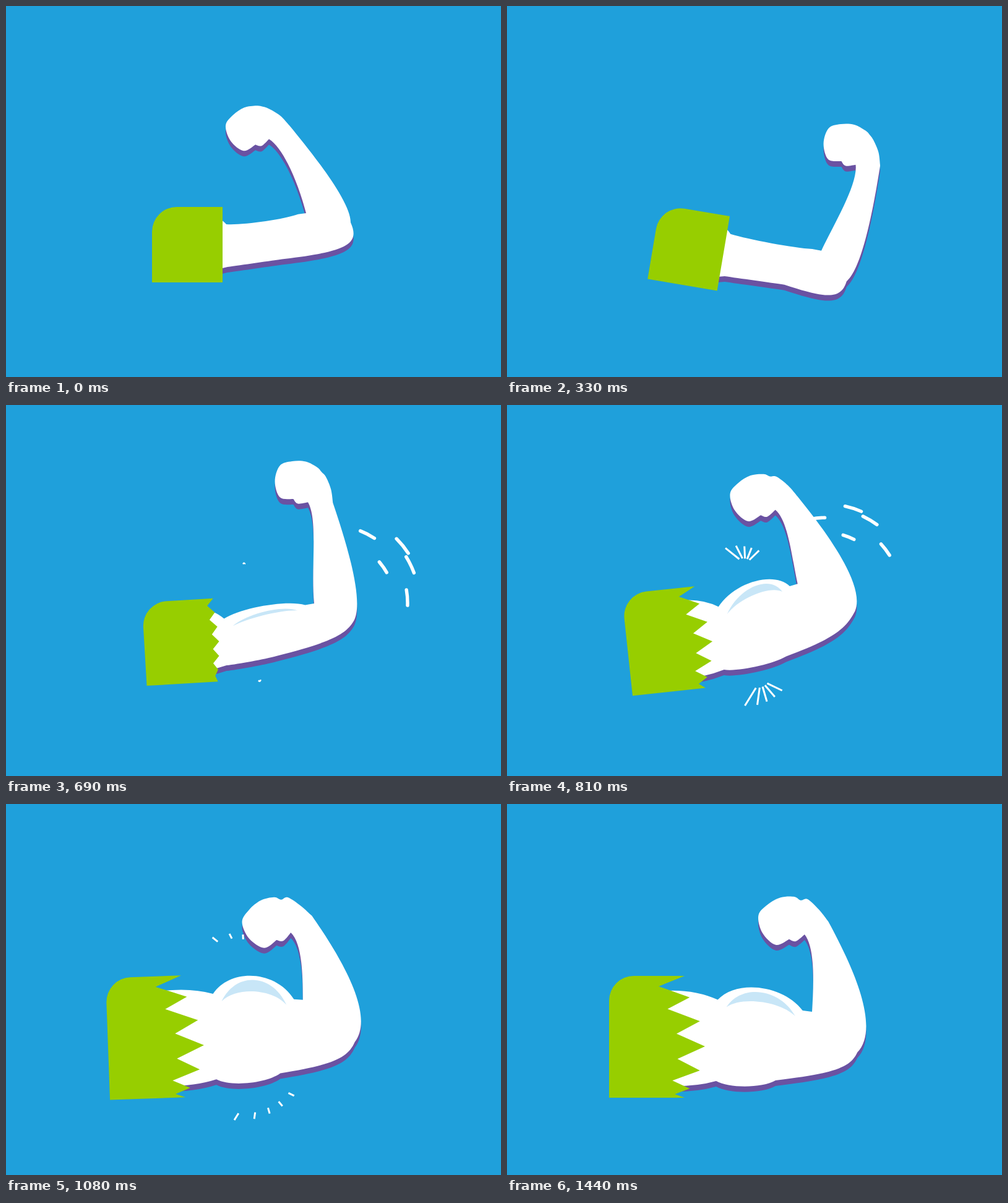
These frames come from a looping animation (800 px wide and 600 px high, 1590 ms). An HTML page:

```html
<!DOCTYPE html>
<html lang="en">
<head>
<meta charset="utf-8">
<title>Flexing arm</title>
<style>
  html, body { margin: 0; width: 100%; height: 100%; overflow: hidden; background: #1fa0db; }
  svg { display: block; width: 800px; height: 600px; }
</style>
</head>
<body>
<svg viewBox="0 0 800 600">
  <path id="shadow" fill="#6a52a2" transform="translate(0 9)"/>
  <path id="arm" fill="#fff"/>
  <path id="shine" fill="#c8e6f7"/>
  <path id="sleeve" fill="#97ce00"/>
  <path id="burst" fill="none" stroke="#fff" stroke-width="3"/>
  <path id="swoosh" fill="none" stroke="#fff" stroke-width="5.4" stroke-linecap="round"/>
</svg>
<script>
const LOOP = 1590, STEP = 30;
const SHOULDER = [265, 392];

const add = (a, b, k = 1) => [a[0] + b[0] * k, a[1] + b[1] * k];
const sub = (a, b) => add(a, b, -1);
const mix = (a, b, k) => a.map((v, i) => v + (b[i] - v) * k);
const polar = (r, deg) => [r * Math.cos(deg * Math.PI / 180), r * Math.sin(deg * Math.PI / 180)];
const turn = ([x, y], deg) => {
  const [c, s] = polar(1, deg);
  return [x * c - y * s, x * s + y * c];
};
const fmt = p => p[0].toFixed(2) + ' ' + p[1].toFixed(2);
const cubic = (...p) => 'C' + p.map(fmt).join(' ');

// arm, notch and tip are [distance, angle] from the inner elbow; dent is an offset from it
const bent = {
  elbow: [485, 335], arm: [134, -116.6], notch: [73.5, 11.8], tip: [109, 32.7], dent: [-35, 74],
  fist: 0, tilt: 0, strength: 0, flex: -4, bow: 10
};
const lowered = {
  ...bent, elbow: [494, 355], arm: [136, -105.4], notch: [71.5, 20.5], tip: [106, 38.5],
  dent: [-44, 70], tilt: 5
};
const straight = {
  elbow: [530, 464], arm: [177, 0.3], notch: [51, 107], tip: [58, 134], dent: [-85, 27],
  fist: 115, tilt: 15.7, strength: 0, flex: 0, bow: -10
};
const raised = {
  elbow: [498, 321], arm: [164, -93.5], notch: [70, 23.6], tip: [74, 50.5], dent: [-61, 85],
  fist: 35, tilt: -3.4, strength: 0.17, flex: 10, bow: -2
};
const peak = {
  elbow: [448, 272], arm: [83, -113.5], notch: [133.6, 30.6], tip: [147, 47.8], dent: [22, 139],
  fist: -18, tilt: -7.5, strength: 1, flex: 37, bow: 7
};
const rest = {
  elbow: [493, 336], arm: [125.6, -95.5], notch: [98.4, 42], tip: [113.5, 58.7], dent: [-59, 111],
  fist: 5, tilt: 0, strength: 1, flex: 28, bow: 7
};
const relaxed = { ...rest, elbow: [492, 334], arm: [121, -95], fist: 0, flex: 32 };

const flat = pose => Object.values(pose).flat();
const KEYS = [
  [0, flat(bent)],
  [210, flat(lowered)],
  [510, flat(straight)],
  [540, mix(flat(lowered), flat(straight), 1.025)],
  [690, flat(raised)],
  [960, flat(peak)],
  [1125, mix(flat(peak), flat(relaxed), 0.93)],
  [1200, flat(relaxed)],
  [1440, flat(rest)]
];

// Monotone cubic through [time, values] keys, at rest at both ends
function at(track, t) {
  const n = track.length - 1;
  t = Math.min(Math.max(t, track[0][0]), track[n][0]);
  let k = 0;
  while (k < n - 1 && t > track[k + 1][0]) k++;
  const [t0, a] = track[k], [t1, b] = track[k + 1];
  const h = t1 - t0, u = (t - t0) / h, u2 = u * u, u3 = u2 * u;
  const rate = (j, i) => (track[j + 1][1][i] - track[j][1][i]) / (track[j + 1][0] - track[j][0]);
  const slope = (j, i) => {
    if (j === 0 || j === n) return 0;
    const p = rate(j - 1, i), q = rate(j, i);
    return p * q > 0 ? 2 * p * q / (p + q) : 0;
  };
  return a.map((v, i) => v + (b[i] - v) * (3 * u2 - 2 * u3)
    + h * slope(k, i) * (u3 - 2 * u2 + u) + h * slope(k + 1, i) * (u3 - u2));
}

// Resolve a pose to points on the stage
function rig(t) {
  const [ex, ey, ar, aa, nr, na, tr, ta, dx, dy, fist, tilt, s, flex, bow] = at(KEYS, t);
  const elbow = [ex, ey];
  const place = (x, y) => add(SHOULDER, turn([x, y], tilt));
  const m = flex * Math.min(1, s);
  const armpit = place(91 - 0.55 * m, -39 - 1.3 * m);
  return {
    elbow, fist, s, flex, bow, place, armpit,
    biceps: mix(elbow, armpit, 0.1),
    thumb: add(elbow, polar(ar, aa)),
    notch: add(elbow, polar(nr, na)),
    tip: add(elbow, polar(tr, ta)),
    dent: add(elbow, [dx, dy])
  };
}

// Rounded hump from a to b, rising by the given height
function dome(a, b, height) {
  const up = [0, -height / 0.75];
  return cubic(add(mix(a, b, 0.22), up), add(mix(a, b, 0.78), up), b);
}

// Smooth curve through points, starting at the first
function spline(p) {
  let d = '';
  for (let i = 0; i < p.length - 1; i++) {
    const before = p[i - 1] || p[i], after = p[i + 2] || p[i + 1];
    d += cubic(add(p[i], sub(p[i + 1], before), 1 / 6),
      add(p[i + 1], sub(after, p[i]), -1 / 6), p[i + 1]);
  }
  return d;
}

// Thumb and knuckles, seen from the inner wrist; strength brings out a knuckle
function fistPoints({ thumb, fist, s }) {
  return [[0, 0], [-12, 11], [-22, 9], [-41, 19], [-62, 3], [-70, -22], [-58, -39], [-40, -51],
    [-20, -54], [-10, -52.5 + 3 * s], [0, -49 - 3 * s], [18, -38], [33, -22]]
    .map(p => add(thumb, turn(p, fist), 1 + 0.1 * s));
}

function armPath(r) {
  const { elbow, thumb, notch, tip, dent, place, s } = r;
  const hand = fistPoints(r), wrist = hand[hand.length - 1];

  const v = sub(elbow, thumb), len = Math.hypot(...v), side = [v[1] / len, -v[0] / len];
  const inner = cubic(add(add(elbow, v, -0.35), side, r.bow), add(add(thumb, v, 0.18), side, 15), thumb);

  const w = sub(notch, wrist), out = [w[1], -w[0]], bulge = 0.1 + 0.125 * s;
  const outer = cubic(add(add(wrist, w, 0.3), out, bulge * 0.38), add(add(wrist, w, 0.85), out, bulge), notch);

  const under = place(93 - 20 * s, 30 + 26 * s);
  const span = Math.hypot(...sub(dent, under));
  return 'M' + fmt(place(60 - 90 * s, -52 - 36 * s))
    + `Q${fmt(place(80 - 50 * s, -52 - 44 * s))} ${fmt(r.armpit)}`
    + dome(r.armpit, r.biceps, r.flex) + 'L' + fmt(elbow) + inner
    + spline(hand.slice(0, 3)) + spline(hand.slice(2)) + outer
    + cubic(mix(notch, tip, 0.8), mix(dent, tip, 0.8), dent)
    + dome(dent, under, -s * span * span / 1000)
    + `Q${fmt(place(64 - 26 * s, 38 + 28 * s))} ${fmt(place(35 - 45 * s, 38 + 26 * s))}Z`;
}

function shinePath({ armpit, biceps, flex }) {
  const a = add(armpit, [14, 12]), b = add(biceps, [-12, 9]), h = Math.max(0, flex);
  return 'M' + fmt(a) + dome(a, b, h * 1.12) + dome(b, a, h * 0.56);
}

// The sleeve grows with the muscle while its straight edge rips into teeth
function sleevePath({ place, s }) {
  const left = -29 - 71 * s, top = -67 - 47 * s, bottom = 55 + 28 * s, teeth = 12;
  let d = `M${fmt(place(left, bottom))}L${fmt(place(left, top + 40))}A40 40 0 0 1 ${fmt(place(left + 40, top))}`;
  for (let i = 0; i <= teeth; i++) {
    const f = i / teeth;
    const edge = 85 + (22 + 33 * Math.sin(Math.PI * f) ** 2 - 85) * s;
    const cut = i % 2 ? 44 * (1 - f ** 6) * Math.max(0, s) ** 0.8 : 0;
    const y = top + (bottom - top) * f + 22 * s * Math.sin(Math.PI * f * f);
    d += 'L' + fmt(place(edge - cut, y));
  }
  return d + 'Z';
}

// Rays shooting out below and above the biceps
function burstPath(t) {
  const s = (t - 684) / 456;
  if (s <= 0 || s >= 1) return '';
  const out = 1 - (1 - s) ** 3, inn = s ** 1.3;
  const fan = (centre, first, step, base) => {
    let d = '';
    for (let i = -2; i <= 2; i++) {
      const ray = polar(base + 3 * i * i + 4 * i, first + step * (i + 2));
      d += `M${fmt(add(centre, ray, inn))}L${fmt(add(centre, ray, out))}`;
    }
    return d;
  };
  return fan([410, 445], 25.8, 24, 58) + fan([385, 257], -44, -24.3, 46);
}

// Speed lines circling the elbow, each with a radius and an elevation
const ARCS = [[125, 62.7], [147, 39], [141, 26], [101, 35], [122, 4]];
const SPIN = [ // centre x, y, turn, span
  [540, [530, 480, -75, 0]], [690, [527, 320, 0, 11.8]],
  [960, [500, 301, 61, 7.4]], [1080, [502, 303, 72, 0]]
];
function swooshPath(t) {
  if (t <= 540 || t >= 1080) return '';
  const [x, y, spin, span] = at(SPIN, t);
  return ARCS.map(([r, el]) => {
    const on = side => fmt(add([x, y], polar(r, -(el + spin + side * span / 2))));
    return `M${on(-1)}A${r} ${r} 0 0 0 ${on(1)}`;
  }).join('');
}

const draw = (id, d) => document.getElementById(id).setAttribute('d', d);

function render(t) {
  const r = rig(t), arm = armPath(r);
  draw('shadow', arm);
  draw('arm', arm);
  draw('shine', shinePath(r));
  draw('sleeve', sleevePath(r));
  draw('burst', burstPath(t));
  draw('swoosh', swooshPath(t));
}

const t0 = performance.now();
function tick() {
  const t = (performance.now() - t0) % LOOP;
  render(Math.floor(t / STEP) * STEP);
  requestAnimationFrame(tick);
}
tick();
</script>
</body>
</html>
```
